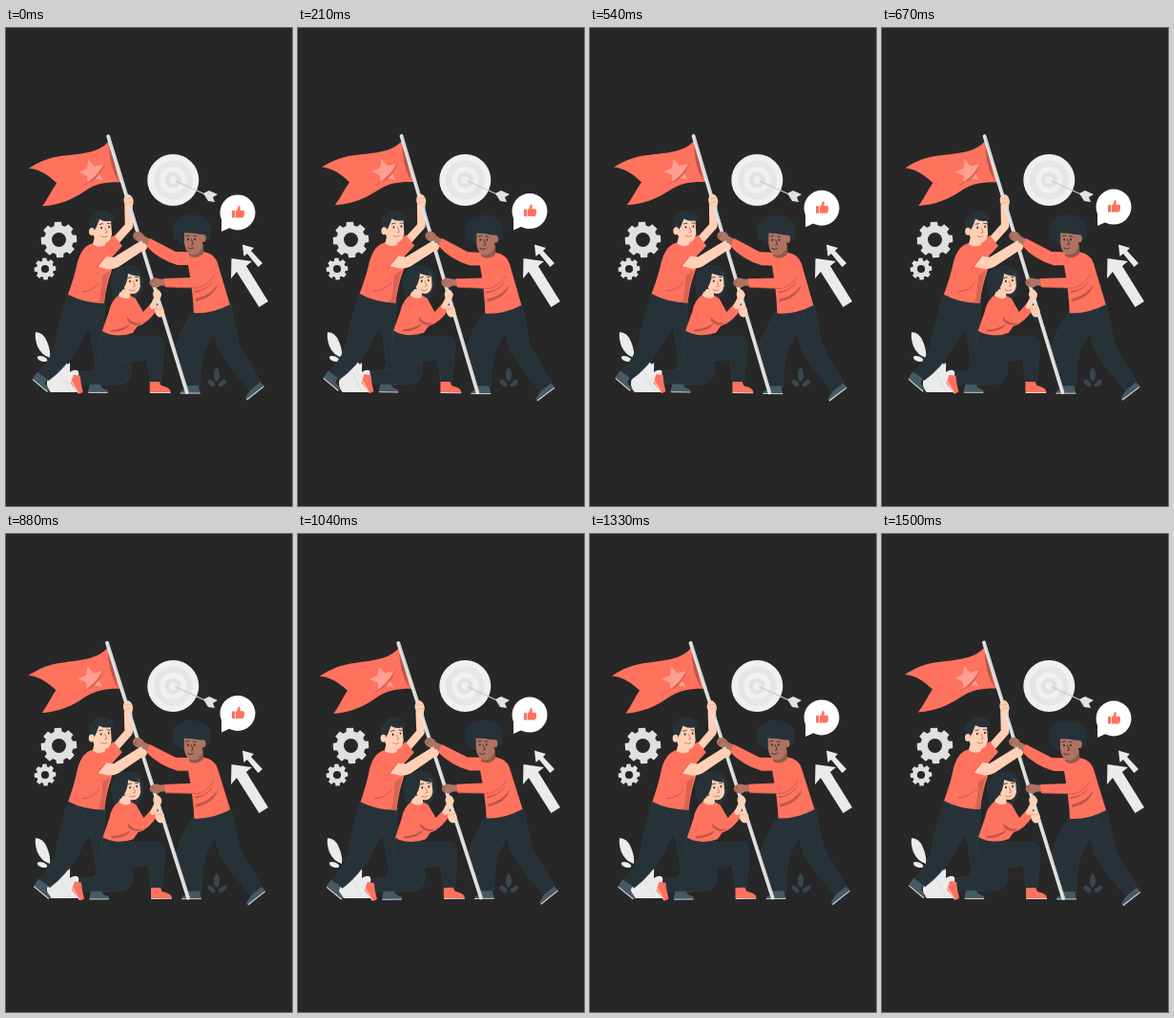
Animation of 300 by 500 pixels, one loop 1540 ms. Source, as an HTML page with a canvas:

```html
<!DOCTYPE html>
<html lang="en">
<head>
<meta charset="utf-8">
<title>Raising the flag</title>
<style>
  html, body { margin: 0; width: 100%; height: 100%; overflow: hidden; background: #272727; }
  canvas { display: block; width: 300px; height: 500px; }
</style>
</head>
<body>
<canvas id="stage" width="300" height="500"></canvas>
<script>
const ctx = document.getElementById('stage').getContext('2d');
const LOOP = 1540, STEPS = 37, TAU = Math.PI * 2;
const BG = '#272727', CORAL = '#ff725e', SHADE = '#b9574a', PANTS = '#263238', SEAM = '#35444b',
  SHOE = '#455a64', SKIN = '#ffd0b5', BROWN = '#ae7461', HAIR = '#263238', PALE = '#e0e0e0', WHITE = '#ebebeb';

function fill(d, color) {
  ctx.fillStyle = color;
  ctx.fill(new Path2D(d));
}

function line(d, color, width = 1) {
  ctx.strokeStyle = color;
  ctx.lineWidth = width;
  ctx.lineCap = ctx.lineJoin = 'round';
  ctx.stroke(new Path2D(d));
}

function oval(x, y, rx, ry, color, angle = 0) {
  ctx.fillStyle = color;
  ctx.beginPath();
  ctx.ellipse(x, y, rx, ry, angle, 0, TAU);
  ctx.fill();
}

const disc = (x, y, r, color) => oval(x, y, r, r, color);

function pants(d) {
  fill(d, PANTS);
  line(d, SEAM, 0.4);
}

function gear(x, y, outer, inner, hole) {
  ctx.fillStyle = PALE;
  ctx.beginPath();
  for (let i = 0; i < 8; i++) {
    const a = i * TAU / 8 - Math.PI / 2 - 0.06;
    for (const [offset, r] of [[-0.27, inner], [-0.19, outer], [0.19, outer], [0.27, inner]]) {
      ctx.lineTo(x + r * Math.cos(a + offset), y + r * Math.sin(a + offset));
    }
  }
  ctx.closePath();
  ctx.fill();
  disc(x, y, hole, BG);
}

function star(x, y, r, tilt) {
  ctx.fillStyle = '#ff9f91';
  ctx.beginPath();
  for (let i = 0; i < 10; i++) {
    const a = i * TAU / 10 + tilt - Math.PI / 2, d = i % 2 ? r * 0.47 : r;
    ctx.lineTo(x + d * Math.cos(a), y + d * Math.sin(a));
  }
  ctx.fill();
}

function target() {
  [[27, '#f0f0f0'], [20.5, '#e6e6e6'], [14, '#f0f0f0'], [8.5, '#e2e2e2'], [4, '#f0f0f0']]
    .forEach(([r, color]) => disc(175.3, 159, r, color));
  line('M178 160L211 175', '#c9c9c9', 1.2);
  fill('M207 173L213 170L222 174L217 177L219 182L212 181Z', PALE);
}

function plants() {
  fill('M31 318Q39 318 43 328Q47 337 46 345Q37 342 33 333Q30 325 31 318Z', WHITE);
  oval(38, 346, 5.5, 2.6, WHITE, 0.35);
  fill('M47 381C40 374 43 363 50 363C43 356 44 349 50 350C54 344 61 346 65 352C68 347 67 354 67 360C74 355 79 359 75 366L78 381Z', WHITE);
  line('M52 351Q59 364 67 380', '#d6d6d6', 0.6);
  oval(221, 362.5, 3, 7, '#37474f');
  oval(215.5, 371.5, 2.6, 4.8, '#37474f', -0.85);
  oval(227, 371.5, 2.6, 4.8, '#37474f', 0.95);
}

function scenery() {
  target();
  gear(55.5, 221.5, 19, 15.2, 7.5);
  gear(41, 252, 11.5, 9, 4.1);
  fill('M236.5 241L258 244L252 249L275 286L265.5 292L242 255L236 262Z', WHITE);
  fill('M248 226.5L260 230L257 233L269 246L264.5 250L253 236L249.5 239Z', WHITE);
  plants();
}

function bubble(dy) {
  ctx.save();
  ctx.translate(0, dy);
  disc(243, 190, 18.5, '#fff');
  fill('M226 197L226 210L237 205Z', '#fff');
  fill('M237 188H240.3V195.5H237Z', CORAL);
  fill('M241 188.5C243.5 187 243 184 244 183C246 182.5 246 186 245.5 187.7H249C251 188 250 194.5 248.5 195.5H241Z', CORAL);
  ctx.restore();
}

function flag() {
  fill('M108 118C98 130 83 131 63 133.5C46 135 35 140 24 147C36 148 45 155 53 162.5C47 171 44 179 38 186.5C57 185 70 179 82 171C95 162 107 161 123 161.5Z', CORAL);
  fill('M108 119Q107 142 118 161.5Q114 140 108 119Z', SHADE);
  star(90.3, 151, 14, -0.3);
  fill('M79 166Q97 155 104 140Q99 159 79 166Z', '#dd6250');
}

function pole() {
  line('M107 113.5L190 381', '#e3e3e3', 3.8);
  line('M108.4 115L191.2 380', '#c4c4c4', 0.8);
}

function leftManLegs() {
  pants('M84 288L104 286L102 325L107 374L88 374L94 350Z');
  fill('M88 373H99Q100 377 107 379V381H86Z', SHOE);
  line('M87 381.5H106.5', '#e8e8e8', 0.9);
  pants('M65 279L104 287L97 306Q83 316 75 335Q62 357 45 369L33 361C45 350 52 337 54 319Z');
  fill('M33 360L43 367L41 372L46 379L43 381L28 367Z', SHOE);
  line('M28.5 368L43.5 380.5', '#e8e8e8', 1);
}

function leftMan() {
  line('M113 225L129 207L128.5 186', SKIN, 8.5);
  fill('M99 226L113 217L122 228L111 240Z', CORAL);
  fill('M92 225C82 227 78 235 75 245Q72 260 65 279Q82 288 103 288Q105 270 111 253L112 235Q107 227 102 225Z', CORAL);
  fill('M101 259Q101 275 97 288H103Q104 269 109 254Z', '#d96352');
  line('M80 276Q90 276 98 267', SHADE, 0.8);
  fill('M93 218L104 220L104 227Q97 231 91 226Z', SKIN);
  fill('M91 200Q102 193 110 201L111 216Q109 226 101 225Q92 223 91 214Z', SKIN);
  fill('M91 215L87 206Q85 199 91 197Q95 189 104 191.5Q113 192 114 201Q104 204 98 200Q95 209 91 215Z', HAIR);
  oval(90, 213, 3, 4, SKIN);
  face(100, 209, 108, 208, '#c8796c');
  fill('M104 239L113 240L139 224L145 232L118 250Q112 253 106 252L94 249Z', SKIN);
  fill('M83 231Q91 227 99 234L105 239L94 253Q84 248 81 240Z', CORAL);
  line('M94 252L104 240', SHADE, 0.6);
}

function face(x1, y1, x2, y2, mouth) {
  oval(x1, y1, 0.9, 1.2, HAIR);
  oval(x2, y2, 0.9, 1.2, HAIR);
  line(`M${x1 - 2} ${y1 - 3.5}l3.5 -.7M${x2 - 1.5} ${y2 - 3.5}l3 .3`, HAIR, 0.8);
  const mid = (x1 + x2) / 2;
  line(`M${mid} ${y1}l2 5l-2 .7M${mid - 4} ${y1 + 9}q3 2.3 6 0`, mouth, 0.9);
}

function womanLegs() {
  pants('M100 319L128 320L132 358Q131 372 119 373L78 373L77 360L102 357Q96 336 100 319Z');
  pants('M101 317Q130 325 158 322Q166 323 166 334L163 371H151L148 346Q126 353 107 344Q97 333 101 317Z');
  fill('M71 363L78 364L79 372L81 381L77 383L68 372Z', CORAL);
  line('M68.5 369L76 382', '#f3d5d0', 1);
  fill('M151 370H161L163 374Q173 376 173 381H151Z', CORAL);
  line('M151.5 381.5H172.5', '#f3d5d0', 1);
}

function woman() {
  fill('M112 277C106 260 115 248 129 248C142 248 148 260 143 274Q138 288 120 288Q112 284 112 277Z', HAIR);
  fill('M119 279Q110 285 108 297L101 317Q115 325 133 319L138 312Q150 309 160 292L154 286L144 297L136 283L129 279Z', CORAL);
  fill('M127 302Q134 311 143 308Q137 314 128 307ZM110 316Q123 315 131 309Q126 318 110 318Z', SHADE);
  fill('M121 273L131 274L130 282Q124 285 118 280Z', SKIN);
  fill('M125 257Q134 251 140 258L141 270Q139 279 132 278Q124 276 123 268Z', SKIN);
  fill('M120 277Q116 259 127 253Q136 251 141 260Q133 259 128 257Q128 268 120 277Z', HAIR);
  face(130, 265, 137, 264, '#c8796c');
  line('M154 291L160 279', SKIN, 6);
}

function rightManLegs() {
  pants('M212 292L236 289Q239 306 244 329Q253 347 268 370L257 380Q236 357 223 335Z');
  pants('M197 295L227 293Q224 310 213 327Q204 339 204 375L187 375Q186 352 178 333Q184 314 197 295Z');
  fill('M188 374H202L204 382H183Q183 379 188 378Z', SHOE);
  line('M183.5 382H203.5', '#dedede', 0.9);
  fill('M256 379L267 370L271 374L254 389L251 387Z', SHOE);
  line('M253 388.5L270.5 375', '#e8e8e8', 1);
}

function rightMan() {
  line('M152 225L139 218', BROWN, 6.5);
  fill('M202 235Q190 234 178 234L151 220L147 228Q160 242 180 248L204 248Z', CORAL);
  fill('M193 236L207 234Q219 236 222 246L235 289Q216 299 197 298Q196 274 191 248Z', CORAL);
  fill('M199 283Q213 281 222 268Q218 282 199 286ZM198 275Q210 275 218 263Q213 274 198 277Z', SHADE);
  fill('M193 230L207 226L207 236Q199 243 192 238Z', '#8f5b4c');
  disc(195, 209, 13, HAIR);
  for (let i = 0; i < 12; i++) {
    const a = Math.PI * (0.93 + i * 0.108);
    disc(195 + 16 * Math.cos(a), 210 + 10.5 * Math.sin(a), 4.6, HAIR);
  }
  disc(180, 217, 5, HAIR);
  disc(185, 222, 4, HAIR);
  disc(210, 217, 5, HAIR);
  fill('M187 211Q197 207 206 214L206 229Q202 238 195 237Q188 235 187 225Z', BROWN);
  oval(207, 220, 2.8, 4, BROWN);
  fill('M185 211Q196 202 210 213L205 216Q195 214 186 214Z', HAIR);
  face(191, 221, 198, 221, '#512b24');
  line('M171 266L158 266', BROWN, 7);
  fill('M217 242Q225 247 220 257Q214 269 202 272L167 271L166 262L194 261L207 247Z', CORAL);
  line('M169 271L201 272Q212 269 218 259', SHADE, 0.7);
}

function hands() {
  oval(128.5, 181, 5, 7, SKIN, -0.2);
  oval(143, 229, 5, 4.5, SKIN);
  oval(139, 218, 6, 5, BROWN, 0.4);
  oval(157, 266.5, 6.5, 5, BROWN);
  oval(158.5, 279, 4.3, 5.7, SKIN, -0.2);
  oval(161, 296, 4.8, 6.5, SKIN, -0.2);
  line('M125 179l7 -1M126 183l7 -1M157 294l7 -1', '#e3a493', 0.6);
  line('M154 264l-2 5M137 216l-2 4', '#7d4d3f', 0.6);
}

function team(angle) {
  ctx.save();
  ctx.translate(150, 243);
  ctx.rotate(angle);
  ctx.translate(-150, -243);
  [flag, leftManLegs, womanLegs, rightManLegs, leftMan, rightMan, woman, pole, hands].forEach(draw => draw());
  ctx.restore();
}

function render(now) {
  const step = Math.floor(now % LOOP / LOOP * STEPS);
  const phase = step / STEPS * TAU;
  ctx.fillStyle = BG;
  ctx.fillRect(0, 0, 300, 500);
  scenery();
  bubble(3 * Math.cos(phase + 0.15));
  team(0.0145 * Math.sin(phase + 0.12));
}

const start = performance.now();
function tick() {
  render(performance.now() - start);
  requestAnimationFrame(tick);
}
tick();
</script>
</body>
</html>
```
